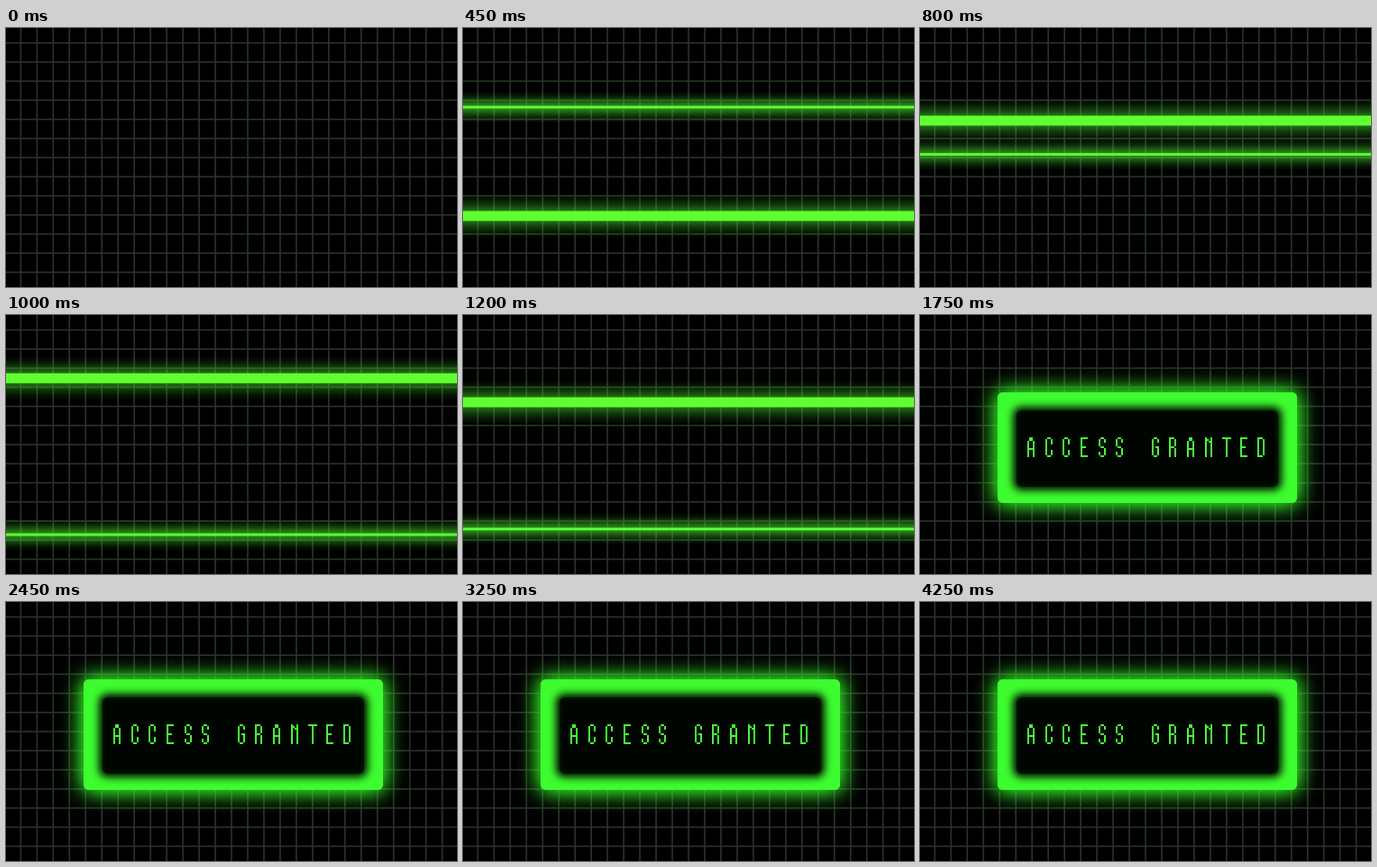
Animation of 500x288 px, one loop 5.1 s. Source, as an HTML page with a canvas:

```html
<!DOCTYPE html>
<html lang="en">
<head>
<meta charset="utf-8">
<title>Access granted</title>
<style>
  html, body { margin: 0; width: 100%; height: 100%; overflow: hidden; background: #000; }
  canvas { display: block; }
</style>
</head>
<body>
<canvas id="stage" width="500" height="288" role="img" aria-label="ACCESS GRANTED">ACCESS GRANTED</canvas>
<script>
const ctx = document.getElementById('stage').getContext('2d');
const LOOP = 5100, TICK = 50, PANEL_AT = 1700;
const MESSAGE = 'ACCESS GRANTED';

// Beam heights over time: [ms, y]
const THIN = [[0, 312], [450, 88], [580, 43], [800, 140.5], [1080, 261], [1200, 238], [1650, 78]];
const THICK = [[0, -26], [310, 232], [450, 209], [800, 103], [980, 70], [1200, 97], [1650, 206]];

// Pen strokes on a 4 x 11 cell grid, each point a hex pair: column, row
const GLYPHS = {
  A: '0a 03 10 20 33 3a,06 36',
  C: '33 31 20 10 01 09 1a 2a 39 37',
  D: '00 0a 2a 39 31 20 00',
  E: '30 00 0a 3a,05 25',
  G: '32 31 20 10 01 09 1a 2a 39 35 25',
  N: '0a 00 11 22 34,30 3a',
  R: '0a 00 20 31 34 25 05,25 37 3a',
  S: '32 31 20 10 01 04 36 39 2a 1a 09 08',
  T: '00 40,20 2a'
};

// Smooth curve through the keys, level at turning points
function follow(keys, t) {
  let i = 0;
  while (i < keys.length - 2 && t > keys[i + 1][0]) i++;
  const slope = k => {
    const a = keys[Math.max(k - 1, 0)], b = keys[k], c = keys[Math.min(k + 1, keys.length - 1)];
    if ((b[1] - a[1]) * (c[1] - b[1]) < 0) return 0;
    return (c[1] - a[1]) / (c[0] - a[0]);
  };
  const [t0, y0] = keys[i], [t1, y1] = keys[i + 1];
  const d = t1 - t0, u = (t - t0) / d, v = 1 - u;
  return v * v * (1 + 2 * u) * y0 + u * u * (3 - 2 * u) * y1
    + d * u * v * (v * slope(i) - u * slope(i + 1));
}

function drawGrid() {
  ctx.fillStyle = '#000';
  ctx.fillRect(0, 0, 500, 288);
  ctx.fillStyle = '#293529';
  for (let x = 15.6; x < 500; x += 17.97) ctx.fillRect(x, 0, 1.6, 288);
  for (let y = 15.8; y < 288; y += 21.25) ctx.fillRect(0, y, 500, 1.6);
}

function drawBeam(y, half, reach) {
  const glow = ctx.createLinearGradient(0, y - reach, 0, y + reach);
  [[0, 0], [0.25, 0.1], [0.5, 0.28], [0.75, 0.52], [1, 0.75]].forEach(([p, alpha]) => {
    const color = `rgba(62,205,40,${alpha})`;
    glow.addColorStop(p / 2, color);
    glow.addColorStop(1 - p / 2, color);
  });
  ctx.fillStyle = glow;
  ctx.fillRect(0, y - reach, 500, reach * 2);
  ctx.fillStyle = '#60ff32';
  ctx.fillRect(0, y - half, 500, half * 2);
}

function fillRound(x, y, w, h, r, color) {
  ctx.fillStyle = color;
  ctx.beginPath();
  ctx.roundRect(x, y, w, h, r);
  ctx.fill();
}

function drawGlyph(strokes, left, top) {
  for (const stroke of strokes.split(',')) {
    const points = stroke.split(' ').map(p => [...p].map(c => parseInt(c, 16)));
    points.slice(1).forEach(([x1, y1], i) => {
      const [x0, y0] = points[i];
      const steps = Math.max(Math.abs(x1 - x0), Math.abs(y1 - y0));
      for (let s = 0; s <= steps; s++) {
        const x = Math.round(x0 + (x1 - x0) * s / steps);
        const y = Math.round(y0 + (y1 - y0) * s / steps);
        ctx.fillRect(left + x * 2, top + y * 2, 2, 2);
      }
    });
  }
}

function drawPanel() {
  ctx.save();
  ctx.shadowColor = '#2fe524';
  ctx.shadowBlur = 23;
  for (let pass = 0; pass < 2; pass++) fillRound(86, 86, 332, 123, 6, '#3dfc2f');
  ctx.restore();

  ctx.save();
  ctx.filter = 'blur(4px)';
  fillRound(103, 102, 298, 93, 9, '#020802');
  ctx.restore();
  fillRound(107, 106, 290, 85, 6, 'rgba(0,4,0,0.6)');

  ctx.fillStyle = '#48f53a';
  [...MESSAGE].forEach((letter, i) => {
    if (GLYPHS[letter]) drawGlyph(GLYPHS[letter], Math.round(119 + i * 19.65), 136);
  });
}

function render(now) {
  const t = Math.floor(now % LOOP / TICK) * TICK;
  drawGrid();
  if (t >= PANEL_AT) {
    drawPanel();
  } else if (t > 0) {
    drawBeam(follow(THICK, t), 5.5, 25);
    drawBeam(follow(THIN, t), 1.4, 18);
  }
}

const start = performance.now();
function loop() {
  render(performance.now() - start);
  requestAnimationFrame(loop);
}
loop();
</script>
</body>
</html>
```
